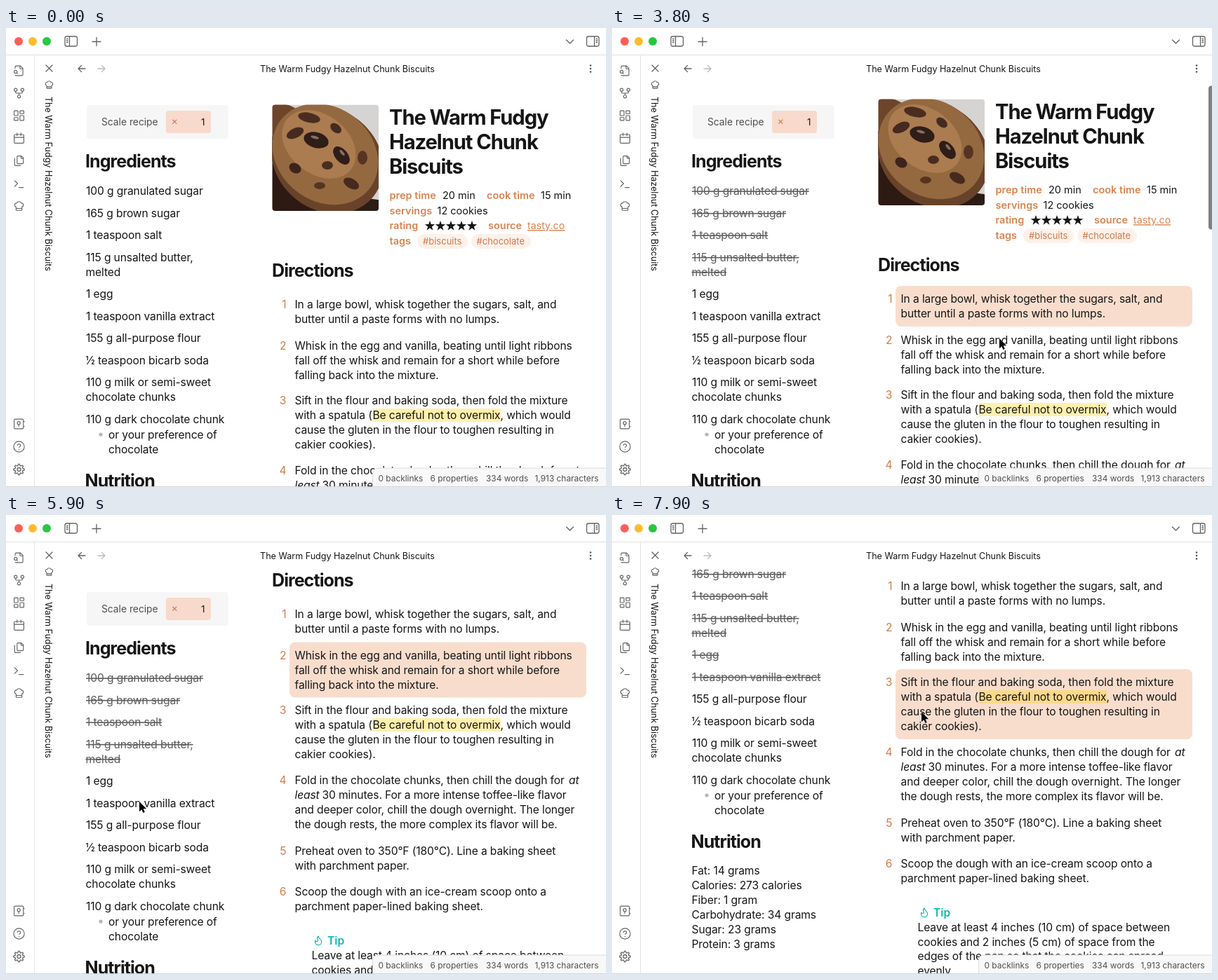
Recreate the animation shown at these times as an HTML page. Size 855 by 655 pixels, loop 8000 ms.

```html
<!DOCTYPE html>
<html lang="en">
<head>
<meta charset="utf-8">
<title>Recipe note</title>
<style>
html, body { margin: 0; width: 100%; height: 100%; overflow: hidden; background: #fff; }
svg { display: block; }
text { font-family: Inter, "Open Sans", sans-serif; font-weight: 430; font-optical-sizing: none; fill: #161616; white-space: pre; }
.body { letter-spacing: -.11px; }
.h1 { font-weight: 680; letter-spacing: -1.1px; }
.h2 { font-weight: 680; letter-spacing: -.92px; }
.key { font-weight: 600; fill: #d98350; }
.num { fill: #d27c4a; text-anchor: end; }
.tag { fill: #d27848; }
.link { fill: #d98350; text-decoration: underline; }
.tip { font-weight: 600; fill: #08b9b5; }
.it { font-style: italic; letter-spacing: -.11px; }
.dim { fill: #505050; }
.mid { text-anchor: middle; }
.done text { fill: #5c5c5c; text-decoration: line-through; }
.icon { fill: none; stroke: #636363; stroke-linecap: round; stroke-linejoin: round; }
</style>
</head>
<body>
<svg id="stage" width="855" height="655" viewBox="0 0 855 655"></svg>
<script>
const TITLE = ['The Warm Fudgy', 'Hazelnut Chunk', 'Biscuits'];
const NAME = TITLE.join(' ');
const f = n => n.toFixed(2);

// y is the middle of the capitals
const txt = (x, y, s, size = 15.6, cls = 'body') =>
  `<text x="${x}" y="${f(y + size * .364)}" font-size="${size}" class="${cls}">${s}</text>`;
const rect = (x, y, w, h, r, fill, more = '') =>
  `<rect x="${x}" y="${y}" width="${w}" height="${h}" rx="${r}" fill="${fill}" ${more}/>`;
const dot = (x, y, r, fill) => `<circle cx="${x}" cy="${y}" r="${r}" fill="${fill}"/>`;
const ring = (x, y, r) => `M${x - r} ${y}a${r} ${r} 0 1 0 ${2 * r} 0a${r} ${r} 0 1 0 ${-2 * r} 0`;
const box = (x, y, w, h, r = 1) =>
  `M${x + r} ${y}h${w - 2 * r}a${r} ${r} 0 0 1 ${r} ${r}v${h - 2 * r}a${r} ${r} 0 0 1 ${-r} ${r}` +
  `h${2 * r - w}a${r} ${r} 0 0 1 ${-r} ${-r}v${2 * r - h}a${r} ${r} 0 0 1 ${r} ${-r}`;
const polar = (n, radius, turn = 0) => 'M' + Array.from({length: n}, (_, i) => {
  const a = i / n * 2 * Math.PI + turn, r = radius(i, a);
  return f(r * Math.cos(a)) + ' ' + f(r * Math.sin(a));
}).join('L') + 'Z';

// icons live on a 24 unit grid and are centred on x, y
const icon = (x, y, d, size = 16.5, more = '') => {
  const k = size / 24;
  return `<path class="icon" d="${d}" stroke-width="${f(1.15 / k)}" ${more}
    transform="translate(${f(x - 12 * k)} ${f(y - 12 * k)}) scale(${f(k)})"/>`;
};
const HAT = 'M17 21a1 1 0 0 0 1-1v-5.4c0-.4.3-.8.7-1a4 4 0 0 0-2.1-7.6 5 5 0 0 0-9.2 0 4 4 0 0 0-2.1 7.6c.4.2.7.6.7 1V20a1 1 0 0 0 1 1ZM6 17h12';
const RIBBON = [
  [61, 'M14 2v4a2 2 0 0 0 2 2h4M4.3 21a2 2 0 0 0 1.7 1H18a2 2 0 0 0 2-2V7l-5-5H6a2 2 0 0 0-2 2v3M9 18l-1.8-1.8' + ring(5, 14, 3)],
  [93, ring(12, 19, 3) + ring(5, 5, 3) + ring(19, 5, 3) + 'M19 8v2q0 2-2 2H7q-2 0-2-2V8M12 12v4'],
  [125, box(2, 2, 8, 10) + box(14, 2, 8, 6) + box(14, 12, 8, 10) + box(2, 16, 8, 6)],
  [157.5, box(2, 4, 20, 18, 2) + 'M8 1v5M16 1v5M2 10h20'],
  [189.5, 'M21 7h-3a2 2 0 0 1-2-2V2M10 18a2 2 0 0 1-2-2V4a2 2 0 0 1 2-2h7l4 4v10a2 2 0 0 1-2 2ZM3 7v13a2 2 0 0 0 2 2h10'],
  [222, 'M3 18l6-6-6-6M12 20h9'],
  [254, HAT],
  [565, box(2, 2, 19, 20, 2) + ring(11.5, 10, 3) + 'M11.5 13v4M21 7h2M21 17h2'],
  [597.5, ring(12, 12, 11) + 'M9 9a3 3 0 0 1 6 1c0 2-3 3-3 3M12 17.5v.1']
];

function frame() {
  const lights = ['#ff5f57', '#febc2e', '#28c840'].map((c, i) => dot(18 + 20 * i, 19, 6, c)).join('');
  const gear = polar(96, (i, a) => 6.6 + 1.1 * Math.tanh(2.5 * Math.cos(8 * a)));
  return lights +
    '<path d="M0 38.5H855M40.5 38V655" stroke="#e2e2e2"/>' +
    '<g class="icon" stroke-width="1.3">' +
    `<path d="${box(84, 12, 17.5, 14, 2.5)}M90.5 12v14M86.5 15.5h1.6M86.5 18h1.6M86.5 20.5h1.6"/>` +
    `<path d="${box(827.5, 12, 17.5, 14, 2.5)}M838.5 12v14M841 15.5h1.6M841 18h1.6M841 20.5h1.6"/>` +
    '<path d="M123 19.5h12M129 13.5v12M798.5 17l5 5 5-5M57 53l9 9M66 53l-9 9M113 58h-10M107.5 53.5l-4.5 4.5 4.5 4.5"/>' +
    '<path stroke="#bbb" d="M131 58h10M136.5 53.5l4.5 4.5-4.5 4.5"/>' +
    `<path d="${gear}${ring(0, 0, 2.5)}" transform="translate(18.5 630)"/></g>` +
    RIBBON.map(([y, d]) => icon(18.5, y, d)).join('') + icon(61.5, 81, HAT, 14) +
    [53.5, 58, 62.5].map(y => dot(833, y, 1.3, '#555')).join('') +
    txt(486.5, 58, NAME, 12.55, 'mid') +
    `<g transform="translate(61 98) rotate(90)">${txt(0, 0, NAME, 12.55, '')}</g>`;
}

const FOODS = [
  [232.5, '100 g granulated sugar'], [264, '165 g brown sugar'], [295.5, '1 teaspoon salt'],
  [327, '115 g unsalted butter,', 'melted'], [379.5, '1 egg'], [411, '1 teaspoon vanilla extract'],
  [442.5, '155 g all-purpose flour'], [505.5, '110 g milk or semi-sweet', 'chocolate chunks'],
  [558, '110 g dark chocolate chunk']
];
const FACTS = ['Fat: 14 grams', 'Calories: 273 calories', 'Fiber: 1 gram', 'Carbohydrate: 34 grams', 'Sugar: 23 grams', 'Protein: 3 grams'];

function leftPane() {
  return rect(115, 110, 201.5, 48, 4, '#f6f6f6') + rect(228, 118, 64, 32, 4, '#f7dacb') +
    txt(136, 134, 'Scale recipe', 13.8, 'dim') + txt(235.5, 133, '×', 14.5, 'tag') + txt(278, 134.5, '1', 13.5, '') +
    txt(113, 190, 'Ingredients', 25, 'h2') +
    FOODS.map(([y, ...lines], i) =>
      `<g id="food${i}">${lines.map((s, k) => txt(k ? 113.5 : 114, y + 21 * k, s)).join('')}</g>`).join('') +
    txt(113.5, 474, '½') + txt(131, 474, 'teaspoon bicarb soda') +
    dot(135, 580, 2.6, '#b5b5b5') + txt(146, 580, 'or your preference of') + txt(146, 601, 'chocolate') +
    txt(112.5, 646, 'Nutrition', 25, 'h2') +
    FACTS.map((s, i) => txt(113.5, 687 + 21 * i, s)).join('');
}

const STEPS = [
  [394.5, 'In a large bowl, whisk together the sugars, salt, and', 'butter until a paste forms with no lumps.'],
  [453, 'Whisk in the egg and vanilla, beating until light ribbons', 'fall off the whisk and remain for a short while before', 'falling back into the mixture.'],
  [531.5, 'Sift in the flour and baking soda, then fold the mixture', 'with a spatula (', 'cause the gluten in the flour to toughen resulting in', 'cakier cookies).'],
  [631.5, 'Fold in the chocolate chunks, then chill the dough for', '', 'and deeper color, chill the dough overnight. The longer', 'the dough rests, the more complex its flavor will be.'],
  [732, 'Preheat oven to 350°F (180°C). Line a baking sheet', 'with parchment paper.'],
  [790, 'Scoop the dough with an ice-cream scoop onto a', 'parchment paper-lined baking sheet.']
];
const TIP = ['Leave at least 4 inches (10 cm) of space between', 'cookies and 2 inches (5 cm) of space from the', 'edges of the pan so that the cookies can spread', 'evenly.'];

function photo() {
  const blob = (x, y, rx, ry, fill, turn = 0) =>
    `<ellipse rx="${rx}" ry="${ry}" fill="${fill}" transform="translate(${x} ${y}) rotate(${turn})"/>`;
  return '<g clip-path="url(#photoClip)">' + rect(379.5, 109.5, 151.5, 151.5, 0, '#d6d4d2') +
    blob(385, 235, 70, 80, '#2c1a13') + blob(505, 265, 60, 22, '#2b1c16') +
    blob(390, 150, 40, 42, '#6d452b', 20) + blob(458, 188, 84, 72, '#68432a', 38) + blob(455, 180, 80, 67, '#95693f', 38) +
    blob(446, 166, 58, 42, '#ab7c50', 38) +
    blob(442, 160, 18, 11, '#2f1d18', 15) + blob(412, 150, 13, 7, '#452a1f', -25) + blob(432, 128, 16, 7, '#4a2d20', 12) +
    blob(478, 182, 15, 9, '#2f1d18', 50) + blob(458, 196, 8, 6, '#4a2d20') + blob(412, 200, 9, 7, '#3d241b', 30) +
    blob(492, 222, 12, 7, '#452a1f', 30) + blob(470, 143, 9, 6, '#452a1f', 40) + blob(447, 225, 8, 5, '#553522') +
    blob(508, 185, 7, 10, '#553522') + blob(440, 156, 6, 2, '#876f66', 15) + blob(479, 178, 5, 2, '#876f66', 50) + '</g>';
}

function rightPane() {
  const star = polar(10, i => i % 2 ? 3 : 7.6, -Math.PI / 2);
  const meta = (x, y, s, cls = '') => txt(x, y, s, 14.5, cls);
  let s = photo() + TITLE.map((line, i) => txt(546, 127.5 + 35 * i, line, 29.2, 'h1')).join('') +
    meta(546.5, 239, 'prep time', 'key') + meta(622, 239, '20 min') +
    meta(685, 239, 'cook time', 'key') + meta(762, 239, '15 min') +
    meta(546.5, 260.5, 'servings', 'key') + meta(614.5, 260.5, '12 cookies') +
    meta(546.5, 282, 'rating', 'key') + meta(687, 282, 'source', 'key') + txt(743, 282, 'tasty.co', 14.2, 'link') +
    meta(546.5, 303.5, 'tags', 'key') +
    rect(586, 294, 72, 21, 10.5, '#fdf1ea') + rect(663, 294, 85, 21, 10.5, '#fdf1ea') +
    txt(594, 304, '#biscuits', 13, 'tag') + txt(670.5, 304, '#chocolate', 13, 'tag') +
    txt(379, 345.5, 'Directions', 25, 'h2');
  for (let i = 0; i < 5; i++) s += `<path d="${star}" fill="#161616" transform="translate(${604 + 15 * i} 282.5)"/>`;
  STEPS.forEach(([y, ...lines], i) => {
    s += rect(404, y - 18.5, 423, 37 + 21 * (lines.length - 1), 8, '#f8ddcd', `id="step${i}"`);
    s += txt(399.5, y, i + 1, 15.6, 'num');
    if (i == 2) s += rect(522.5, 543, 182.5, 19, 0, 'rgba(255,208,0,.32)');
    s += lines.map((line, k) => txt(411.5, y + 21 * k, line)).join('');
  });
  return s + txt(522.5, 552.5, 'Be careful not to overmix') + txt(704.5, 552.5, ', which would') +
    txt(802, 631.5, 'at', 15.6, 'it') + txt(411.5, 652.5, 'least', 15.6, 'it') +
    txt(450.5, 652.5, '30 minutes. For a more intense toffee-like flavor') +
    icon(445, 860, 'M8.5 14.5A2.5 2.5 0 0 0 11 12c0-1.4-.5-2-1-3-1.1-2.1-.2-4 2-6 .5 2.5 2 4.9 4 6.5 2 1.6 3 3.5 3 5.5a7 7 0 1 1-14 0c0-1.2.4-2.3 1-3a2.5 2.5 0 0 0 2.5 2.5z', 16, 'style="stroke:#08b9b5"') +
    txt(458, 860, 'Tip', 15.6, 'tip') + TIP.map((line, i) => txt(435.5, 881 + 20.9 * i, line)).join('');
}

const status = '<path d="M522.5 656V636q0-8 8-8H856V656Z" fill="#f8f8f8" stroke="#dedede"/>' +
  [[530.5, '0 backlinks'], [604.5, '6 properties'], [684, '334 words'], [753.5, '1,913 characters']]
    .map(([x, s]) => txt(x, 642.5, s, 11.9, 'dim')).join('');

document.getElementById('stage').innerHTML =
  `<defs><clipPath id="paneClip">${rect(42, 77, 813, 578, 0, '#000')}</clipPath>` +
  `<clipPath id="photoClip">${rect(379.5, 109.5, 151.5, 151.5, 4, '#000')}</clipPath></defs>` +
  frame() +
  `<g clip-path="url(#paneClip)"><g id="left">${leftPane()}</g><g id="right">${rightPane()}</g>` +
  rect(338, 79.5, 8, 427, 4, '#808080', 'id="leftBar"') + rect(850, 79.5, 8, 205, 4, '#808080', 'id="rightBar"') + '</g>' +
  status + '<path d="M0 654.5H855" stroke="#d4d4d4"/>' +
  '<path id="cursor" d="M0 0V14.3L3.3 11.2 5.4 16 7.8 15 5.7 10.3H10.2Z" fill="#000" stroke="#fff" paint-order="stroke"/>';

const $ = id => document.getElementById(id);
// linear value between [time, value] keys
function at(t, keys) {
  const i = keys.findIndex(k => k[0] > t);
  if (i < 0) return keys[keys.length - 1][1];
  if (!i) return keys[0][1];
  const [a, u] = keys[i - 1], [b, v] = keys[i];
  return u + (v - u) * (t - a) / (b - a);
}
const pulse = (a, b, c, d) => [[a, 0], [b, 1], [c, 1], [d, 0]];
const ease = p => p * p * (3 - 2 * p);

const MOVES = [ // start, end, x, y
  [1000, 1100, 551, 409], [1600, 2000, 180, 230], [2100, 2300, 226, 262], [2600, 2900, 205, 293],
  [3000, 3200, 167, 335], [3400, 3700, 552, 443], [4500, 4900, 527, 233], [5500, 5900, 190, 409],
  [6000, 6200, 124, 375], [6900, 7200, 441, 281]
];
const STRUCK = [2000, 2300, 2900, 3300, 6400, 6000];
const LEFT = [[6500, 0], [6600, 40], [6700, 98], [6800, 146], [6900, 171], [7000, 180]];
const RIGHT = [[3700, 0], [3800, 8], [3900, 44], [4000, 104], [4100, 161], [4200, 204.5], [4300, 235], [4400, 245],
  [4500, 250], [4700, 253], [7100, 253], [7200, 268], [7300, 284], [7400, 290], [7600, 293]];
const CHOSEN = [pulse(1200, 1400, 5100, 5400), pulse(5100, 5400, 7400, 7700), [[7400, 0], [7700, 1]]];

function pose(t) {
  let x = 549, y = 410;
  for (const [a, b, u, v] of MOVES) {
    const p = ease(Math.min(1, Math.max(0, (t - a) / (b - a))));
    x += (u - x) * p;
    y += (v - y) * p;
  }
  const shift = (id, dx, dy) => $(id).setAttribute('transform', `translate(${f(dx)} ${f(dy)})`);
  shift('cursor', x, y);
  $('cursor').style.display = t < 1000 ? 'none' : '';
  const l = at(t, LEFT), r = at(t, RIGHT);
  shift('left', 0, -l);
  shift('right', 0, -r);
  shift('leftBar', 0, l * .74);
  shift('rightBar', 0, r * .36);
  $('leftBar').style.opacity = at(t, pulse(6500, 6600, 7100, 7400));
  $('rightBar').style.opacity = t < 6000 ? at(t, pulse(3700, 3800, 4600, 4900)) : at(t, pulse(7100, 7200, 7600, 7900));
  STRUCK.forEach((time, i) => $('food' + i).setAttribute('class', t >= time ? 'done' : ''));
  STEPS.forEach((_, i) => $('step' + i).style.opacity = CHOSEN[i] ? at(t, CHOSEN[i]) : 0);
}

const start = performance.now();
function tick(now) {
  pose(Math.floor(Math.max(0, now - start) % 8000 / 100) * 100);
  requestAnimationFrame(tick);
}
tick(start);
</script>
</body>
</html>
```
